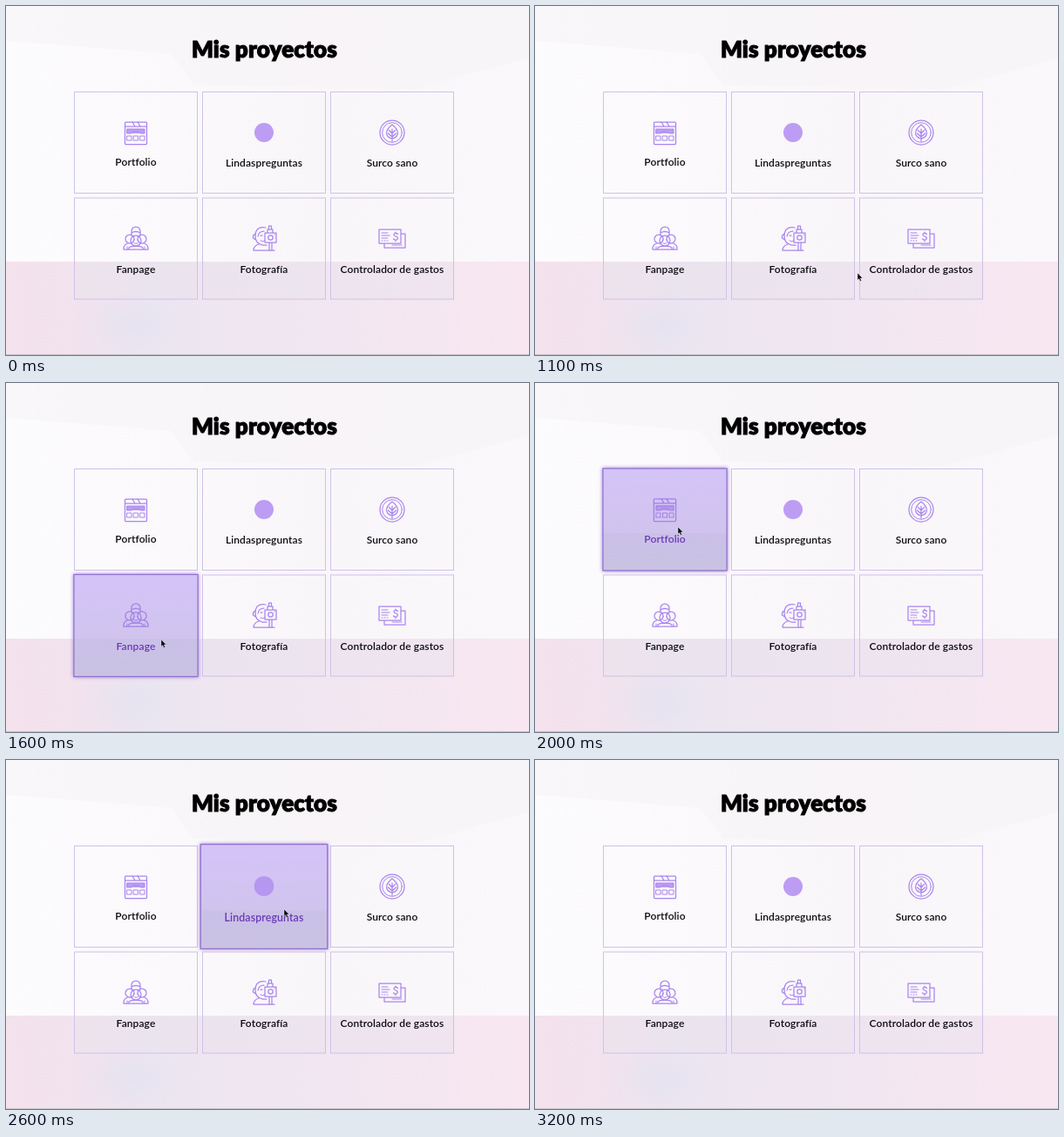
An HTML page that plays this animation: 600x400 px, repeating every 4 s.

```html
<!DOCTYPE html>
<html lang="es">
<head>
<meta charset="utf-8">
<title>Mis proyectos</title>
<style>
  html, body { margin: 0; width: 100%; height: 100%; overflow: hidden; background: #faf7fb; }
  svg { display: block; width: 600px; height: 400px; }
  text { text-anchor: middle; font-family: Lato, sans-serif; }
  .title { font-size: 26px; font-weight: 900; letter-spacing: .15px; stroke: #000; stroke-width: 1; }
  .label { font-size: 12px; font-weight: 600; letter-spacing: .1px; fill: #0c0a10; }
  .frame { fill: none; stroke: #cfc1e8; }
  .icon { fill: none; stroke: #a985ee; stroke-width: 1.25; stroke-linejoin: round; stroke-linecap: round; }
  .icon .solid { fill: #bd9cf3; stroke: none; }
  .icon .thin { stroke-width: 1; }
  .hover .frame { fill: url(#lilac); stroke: #9170cd; stroke-width: 1.2; filter: drop-shadow(0 0 2px #9d7bd8); }
  .hover .label { fill: #6a38b6; }
  .hover .icon { stroke: #a281e2; }
  .hover .icon .solid { fill: #b697ef; }
</style>
</head>
<body>
<svg viewBox="0 0 600 400">
  <defs>
    <linearGradient id="lilac" x2="0" y2="1">
      <stop stop-color="#d4c3f8"/>
      <stop offset=".63" stop-color="#d0c4ee"/>
      <stop offset=".63" stop-color="#cac0e8"/>
      <stop offset="1" stop-color="#c9c2e2"/>
    </linearGradient>
    <linearGradient id="sky">
      <stop stop-color="#fcfbfd"/>
      <stop offset=".3" stop-color="#fbf9fc"/>
      <stop offset=".6" stop-color="#f9f6fa"/>
      <stop offset="1" stop-color="#faf8fb"/>
    </linearGradient>
    <linearGradient id="floor">
      <stop stop-color="#f4e2ed"/>
      <stop offset=".16" stop-color="#f1e3ee"/>
      <stop offset=".28" stop-color="#ece6f1"/>
      <stop offset=".55" stop-color="#f0e6f1"/>
      <stop offset="1" stop-color="#f8e7f1"/>
    </linearGradient>
    <radialGradient id="haze">
      <stop stop-color="#e3e2f1" stop-opacity=".7"/>
      <stop offset="1" stop-color="#e3e2f1" stop-opacity="0"/>
    </radialGradient>
  </defs>
  <rect width="600" height="400" fill="url(#sky)"/>
  <path d="M0 0H600V60L470 95L215 90L190 55L0 40Z" fill="#f8f4f8" opacity=".5"/>
  <rect y="293" width="600" height="107" fill="url(#floor)"/>
  <ellipse cx="145" cy="365" rx="62" ry="42" fill="url(#haze)"/>
  <path d="M79 293.5H220V336H79ZM226 293.5H367V336H226ZM373 293.5H514V336H373Z" fill="#e5e2eb" opacity=".4"/>
  <rect y="399" width="600" height="1" fill="#c9c5cd"/>
  <text class="title" x="296.5" y="58.5">Mis proyectos</text>
  <g id="cards"></g>
  <g id="cursor">
    <path id="arrow" d="M0 0V8.2L1.8 6.6L3 9.4L4.5 8.8L3.3 6H5.8Z" fill="#0b090d" stroke="#fff" stroke-width=".4"/>
    <path id="beam" d="M-1.7-4H1.7M0-4V4M-1.7 4H1.7" fill="none" stroke="#6f687b"/>
  </g>
</svg>
<script>
const $ = id => document.getElementById(id);
const W = 141, H = 116;
const LOOP = 4000, STEP = 100;

// Icons are drawn around the middle of their card's icon area.
const icons = {
  browser: `<rect x="-12.5" y="-12" width="25" height="25.5" rx="1"/>
    <path d="M-12-7H12M-4-12L-1-7M2-12L5-7"/>
    <path class="solid" d="M-10-4H10V1H-10Z"/>
    <path class="thin" d="M-10-4H10V1H5L3-1H-3L-5 1H-10ZM-10 4H-5V9H-10ZM-2.5 4H2.5V9H-2.5ZM5 4H10V9H5Z"/>`,
  disc: `<circle class="solid" r="11"/>`,
  leaf: `<circle r="14"/><circle class="thin" r="11.3"/>
    <path d="M0-9C9-2 8 5 0 7C-8 5-9-2 0-9ZM0-4V10M0 1L3.5-2.5M0 5L4.5 1M0 1L-3.5-2.5M0 5L-4.5 1"/>`,
  crowd: `<path d="M-5-3V-8A5 5 0 0 1 5-8V-3M-5-6Q0-9 5-6"/>
    <circle cx="-7" cy="1" r="5"/><circle cx="7" cy="1" r="5"/>
    <path d="M-14 13V11Q-13 7-10 6.5M14 13V11Q13 7 10 6.5M-8 13V11Q-6 9 0 9T8 11V13M-14 13H14"/>
    <circle cy="3" r="6"/><path class="thin" d="M-2.5 5Q0 8 2.5 5M-2 2H-1.5M1.5 2H2M-10 13V10M10 13V10"/>`,
  camera: `<path d="M2-12Q-10-14-10-2Q-10 6-2 8H3M-10-5Q-13-4-12.5 0L-9.5 2M-12 14Q-12 9-6 7M-12 14H12M-7-2Q-6-8 0-8M-4-3H-2"/>
    <path d="M1-6H14V5H1ZM4-6V-10H10V-6M5.5-14H8.5V-10H5.5ZM6 5V14M9 5V14"/>
    <circle cx="7.5" cy="-.5" r="2.7"/><path class="thin" d="M12-4H12.5M-4 3Q-1 5 1 3"/>`,
  money: `<path d="M-15-10H10V6H-15ZM10-5H15V11H-9V6"/>
    <path class="thin" d="M-12-6H-5M-12-3H-3M-12 0H-5M-12 3H-11M-9 3H-8M-6 3H-5M0 8H11"/>
    <path d="M6.5-4.5Q5-6 3-5.5Q1-4 3-2.5L5.5-1.5Q7.5 .5 5 2Q3 2.5 1.5 1M4-7V-5.5M4 2V3.5"/>`
};

const cards = [
  ["Portfolio", "browser", 183], ["Lindaspreguntas", "disc", 184], ["Surco sano", "leaf", 184],
  ["Fanpage", "crowd", 305.5], ["Fotografía", "camera", 305.5], ["Controlador de gastos", "money", 305.5]
].map(([name, icon, baseline], i) => {
  const x = 78.5 + i % 3 * 147, y = i < 3 ? 98.5 : 220;
  const cx = x + W / 2, cy = y + H / 2;
  const node = document.createElementNS("http://www.w3.org/2000/svg", "g");
  node.innerHTML = `<rect class="frame" x="${x}" y="${y}" width="${W}" height="${H}"/>
    <g class="icon" transform="translate(${cx} ${i < 3 ? 145 : 266})">${icons[icon]}</g>
    <text class="label" x="${cx}" y="${baseline}">${name}</text>`;
  $("cards").append(node);
  return { node, x, y, cx, cy, baseline, label: node.querySelector("text") };
});

// Pointer route: time, x, y
const route = [
  [500, 562, 372], [600, 511, 333], [700, 497, 324], [1000, 450, 312], [1100, 370, 306],
  [1300, 320, 306], [1500, 205, 297], [1600, 178, 294], [1700, 174, 270], [1800, 168, 217],
  [1900, 164, 186], [2000, 164, 165], [2200, 192, 161], [2300, 238, 164], [2600, 319, 171],
  [2700, 345, 169], [2800, 392, 165], [3000, 490, 160], [3100, 538, 156]
];

function pointerAt(t) {
  const n = route.findIndex(p => p[0] >= t);
  if (n < 0 || t < route[0][0]) return null;
  const b = route[n], a = route[n - 1] || b;
  const k = (t - a[0]) / (b[0] - a[0] || 1);
  return { x: a[1] + (b[1] - a[1]) * k, y: a[2] + (b[2] - a[2]) * k };
}

const inside = (c, p) => p && p.x >= c.x && p.x <= c.x + W && p.y >= c.y && p.y <= c.y + H;

function hoverTime(card, t) {
  let start = t;
  while (inside(card, pointerAt(start - STEP))) start -= STEP;
  return t - start + STEP / 2;
}

// One soft swell per second of hovering
const pulse = ms => 1 + .04 * Math.sin(Math.PI * Math.min(1, ms / 1000)) ** 2;

function draw(now) {
  const t = Math.floor(now % LOOP / STEP) * STEP;
  const p = pointerAt(t);
  let overText = false;
  for (const c of cards) {
    const on = inside(c, p);
    const s = on ? pulse(hoverTime(c, t)) : 1;
    c.node.setAttribute("class", on ? "hover" : "");
    c.node.setAttribute("transform", `translate(${c.cx} ${c.cy}) scale(${s}) translate(${-c.cx} ${-c.cy})`);
    if (on) {
      const half = c.label.getComputedTextLength() / 2;
      overText ||= Math.abs(p.x - c.cx) < half && Math.abs(p.y - c.baseline + 4) < 8;
    }
  }
  $("cursor").style.display = p ? "" : "none";
  if (p) $("cursor").setAttribute("transform", `translate(${p.x} ${p.y})`);
  $("arrow").style.display = overText ? "none" : "";
  $("beam").style.display = overText ? "" : "none";
}

const begin = performance.now();
(function tick() {
  draw(performance.now() - begin);
  requestAnimationFrame(tick);
})();
</script>
</body>
</html>
```
